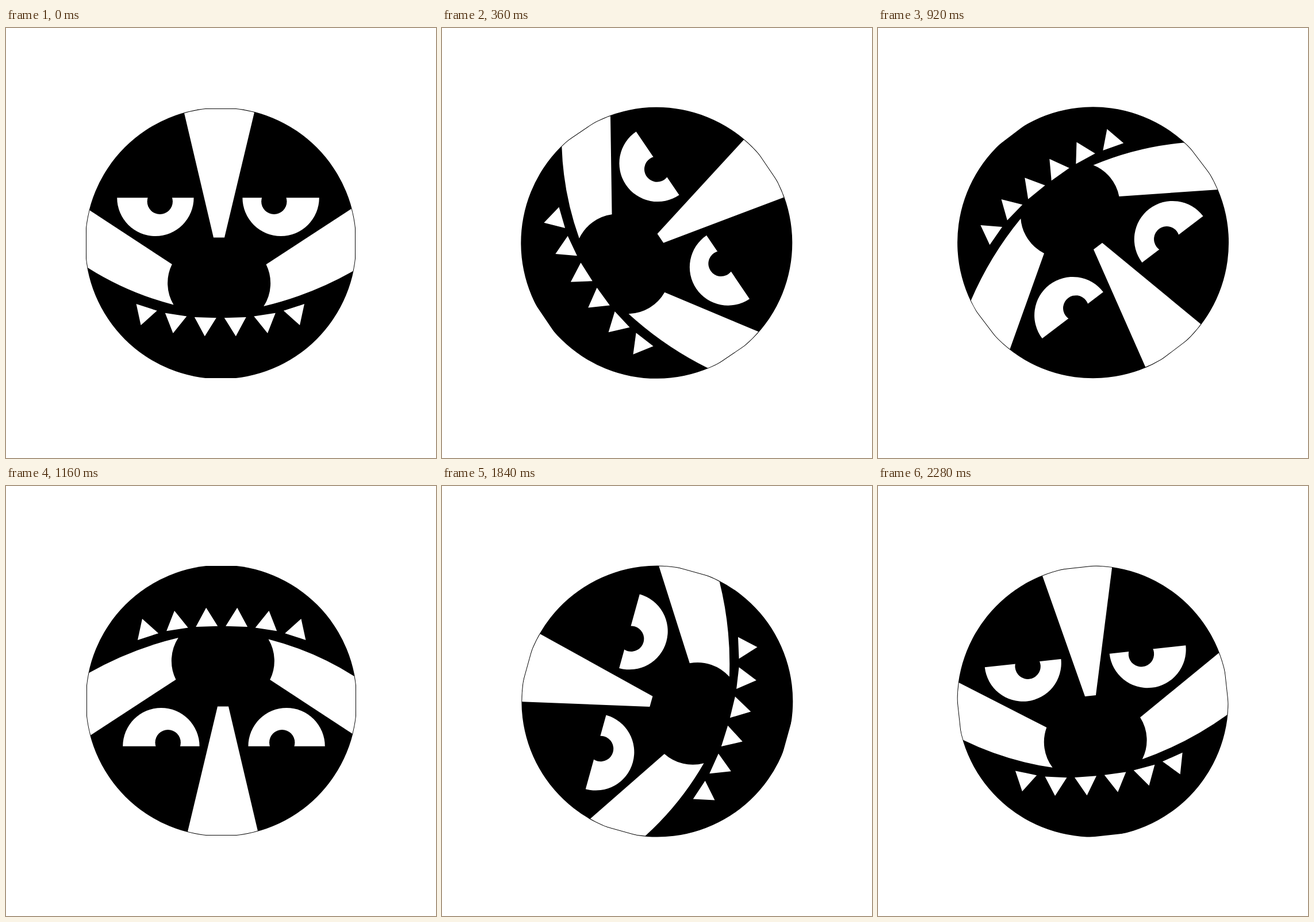
These frames come from a looping animation (748x748 px, 2.32 s). An HTML page:

```html
<!DOCTYPE html>
<html lang="en">
<head>
<meta charset="utf-8">
<title>Rolling face</title>
<style>
  html, body { margin: 0; width: 100%; height: 100%; overflow: hidden; background: #fff; }
  svg { display: block; width: 100%; height: 100%; }
</style>
</head>
<body>
<svg viewBox="0 0 748 748">
  <defs>
    <!-- The disc is a circle whose four sides are trimmed flat by a box. -->
    <circle id="round" cx="373.5" cy="374.5" r="236"/>
    <rect id="box" x="139" y="140" width="469" height="469"/>
    <clipPath id="trim"><use href="#box"/></clipPath>
    <clipPath id="rim" clip-path="url(#trim)"><use href="#round"/></clipPath>
    <path id="eye" d="M193.2 295.3h133.4a66.7 66.7 0 0 1 -133.4 0Z"/>
    <circle id="pupil" cx="267.8" cy="301.8" r="22.2"/>
    <path id="tooth" d="M-19 -10.9H19L0 21.8Z"/>
  </defs>
  <g id="face">
    <g clip-path="url(#rim)">
      <use href="#box"/>
      <g fill="#fff">
        <path d="M305.8 130L361 364.5H380L436 130Z"/>
        <path d="M125 303.5L288.8 411A74 74 0 0 0 291.5 481.5Q212 461 143 417.5L125 406Z"/>
        <path d="M623 300L452.5 411.2A74 74 0 0 1 448.3 484Q530 464.6 603.5 423L623 411.5Z"/>
        <use href="#eye"/>
        <use href="#eye" x="218.2"/>
        <g id="teeth"/>
      </g>
      <use href="#pupil"/>
      <use href="#pupil" x="198.5"/>
      <g fill="none" stroke="#000" stroke-width="1.9">
        <use href="#round"/>
        <use href="#box"/>
      </g>
    </g>
  </g>
</svg>
<script>
  const STEP = 40, COUNT = 58, TEETH = 6, GAP = 52.6;
  const face = document.getElementById('face');
  const teeth = document.getElementById('teeth');

  // Teeth follow the grin: each rises and tilts with its distance from the middle.
  for (let i = 0; i < TEETH; i++) {
    const x = (i - (TEETH - 1) / 2) * GAP;
    const far = Math.abs(x);
    const y = 514.8 - 0.000152 * far ** 2.4;
    const tilt = -Math.sign(x) * 0.0194 * far ** 1.4;
    const tooth = document.createElementNS('http://www.w3.org/2000/svg', 'use');
    tooth.setAttribute('href', '#tooth');
    tooth.setAttribute('transform', `translate(${372.8 + x} ${y}) rotate(${tilt})`);
    teeth.append(tooth);
  }

  function draw(time) {
    const step = Math.floor(time / STEP) % COUNT;
    face.setAttribute('transform', `rotate(${step * 360 / COUNT} 374 374)`);
  }

  const start = performance.now();
  function tick() {
    draw(performance.now() - start);
    requestAnimationFrame(tick);
  }
  draw(0);
  requestAnimationFrame(tick);
</script>
</body>
</html>
```
